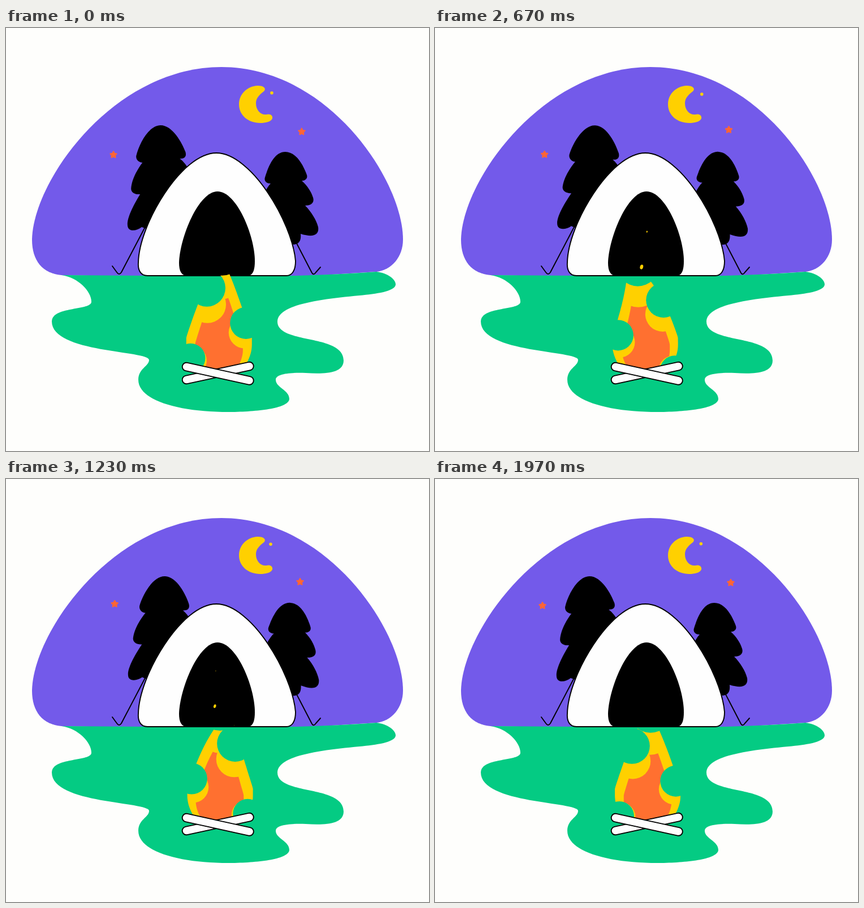
These frames come from a looping animation (748x748 px, 2 s). An HTML page:

```html
<!DOCTYPE html>
<html lang="en">
<head>
<meta charset="utf-8">
<title>Campfire at night</title>
<style>
  html, body { margin: 0; width: 100%; height: 100%; overflow: hidden; background: #fefefc; }
  svg { display: block; width: 100%; height: 100%; }
</style>
</head>
<body>
<svg viewBox="0 0 748 748">
  <defs>
    <mask id="outerMask" maskUnits="userSpaceOnUse" x="250" y="350" width="250" height="280">
      <rect x="250" y="350" width="250" height="280" fill="#fff"/>
      <g id="outerBites"/>
    </mask>
    <mask id="innerMask" maskUnits="userSpaceOnUse" x="250" y="350" width="250" height="280">
      <rect x="250" y="350" width="250" height="280" fill="#fff"/>
      <g id="innerBites"/>
    </mask>
  </defs>

  <path fill="#735aea" d="M98 437C65 434 46 412 46 374C48 270 190 69 381 69C570 69 702 270 702 374C702 405 682 428 655 431L513 440H250Z"/>
  <path fill="#04cb83" d="M98 437L250 438H513Q590 436 655 431C675 433 690 445 689 454C687 466 655 470 625 473C550 480 482 490 480 518C478 560 597 540 597 588C597 612 560 612 530 610C500 609 477 612 477 622C477 636 501 640 501 656C500 672 450 678 400 679C310 680 234 660 234 622C234 602 253 598 253 587C253 570 81 575 81 519C81 492 151 500 151 484C151 466 128 441 98 437Z"/>

  <g fill="#ffd000">
    <path d="M445 102C456 102 461 107 456 112C448 118 442 124 442 133C442 145 450 154 460 153C468 151 472 155 471 160C469 166 458 168 450 168C428 168 412 154 412 135C412 117 426 103 445 102Z"/>
    <circle id="dot" r="2.8"/>
  </g>
  <g fill="#ff6535" stroke="#ff6535" stroke-width="2" stroke-linejoin="round">
    <polygon id="starLeft"/>
    <polygon id="starRight"/>
  </g>

  <path id="treeLeft" d="M273 172C294 172 311 203 317 219C320 229 313 231 307 231C314 236 320 244 326 256L330 300L290 372L240 352C232 358 222 360 217 355C210 346 220 322 237 294C228 295 221 291 221 284C222 268 232 250 241 238C234 238 229 232 230 226C235 205 252 172 273 172Z"/>
  <path id="treeRight" d="M494 219C513 219 526 243 532 260C534 267 528 270 523 270C533 279 540 290 543 300C546 310 538 314 529 314C540 325 549 340 552 352C554 366 544 371 521 364C522 374 520 382 508 383L470 340L458 290C464 279 466 277 468 275C460 275 456 270 458 264C464 245 474 219 494 219Z"/>

  <g fill="none" stroke="#000" stroke-width="1.9" stroke-linecap="round" stroke-linejoin="round">
    <path d="M247 350L204 432Q200 438 196 432L188 421M513 379L541 433Q544 438 548 432L556 423"/>
    <path fill="#fefefe" d="M250 438C238 438 233 428 234 415C235 348 310 221 372 221C433 221 506 343 512 412C512 430 505 438 496 438Z"/>
  </g>
  <path d="M322 439C310 438 306 430 306 415C307 372 340 289 374 289C408 289 440 368 440 412C440 430 436 439 424 439Z"/>

  <g mask="url(#outerMask)">
    <path id="outerFlame" fill="#ffd000"/>
    <g mask="url(#innerMask)"><path id="innerFlame" fill="#ff7030"/></g>
  </g>
  <g id="sparks" fill="#ffd000"/>

  <g stroke-linecap="round">
    <path stroke="#000" stroke-width="16.500" d="M319 622L430.500 598"/>
    <path stroke="#fefefe" stroke-width="12.700" d="M319 622L430.500 598"/>
    <path stroke="#000" stroke-width="16.500" d="M319 599L430.500 623.500"/>
    <path stroke="#fefefe" stroke-width="12.700" d="M319 599L430.500 623.500"/>
  </g>
</svg>
<script>
  const LOOP = 2000;
  const CENTER = 376, BASE = 605, TIP = 412;
  const RISE = 0.2455, BITE_GAP = 124, BITE_TOP = 330;
  const SPARK_COUNT = 7, SPARK_GAP = 240;

  const byId = id => document.getElementById(id);
  const set = (el, attrs) => { for (const k in attrs) el.setAttribute(k, attrs[k]); };
  const addShapes = (parent, tag, count) => Array.from({ length: count }, () =>
    parent.appendChild(document.createElementNS('http://www.w3.org/2000/svg', tag)));
  const clamp = v => Math.min(1, Math.max(0, v));
  const smooth = v => clamp(v) ** 2 * (3 - 2 * clamp(v));
  const wave = (t, period, peak) => Math.cos(2 * Math.PI * (t - peak) / period);
  const move = (id, x, y) => set(byId(id), { transform: `translate(${x} ${y})` });

  const flames = [
    { path: byId('outerFlame'), bites: addShapes(byId('outerBites'), 'circle', 6), sx: 1, sy: 1, biteX: 1 },
    { path: byId('innerFlame'), bites: addShapes(byId('innerBites'), 'circle', 6), sx: 0.73, sy: 0.8, biteX: 0.95 }
  ];
  const sparks = addShapes(byId('sparks'), 'ellipse', SPARK_COUNT);

  const starPoints = Array.from({ length: 10 }, (_, i) => {
    const r = i % 2 ? 3.1 : 6, a = i * Math.PI / 5 - Math.PI / 2;
    return `${(r * Math.cos(a)).toFixed(2)},${(r * Math.sin(a)).toFixed(2)}`;
  }).join(' ');
  set(byId('starLeft'), { points: starPoints });
  set(byId('starRight'), { points: starPoints });

  // Half width of the flame: widens from the tip, then tucks in at the logs.
  const flameWidth = y => y < 560
    ? 58 * clamp((y - TIP) / 135) ** 0.75
    : 58 * Math.cos((y - 560) / 57);

  // The tip swings more than the foot.
  const lean = (y, sway) => sway * (0.25 + 0.75 * Math.min(1.4, clamp((600 - y) / 200) ** 4 * 2.8));

  function drawFlame({ path, bites, sx, sy, biteX }, t, sway) {
    const scaleY = y => BASE + (y - BASE) * sy;
    const left = [], right = [];
    for (let y = TIP; y <= 604; y += 4) {
      const point = side => {
        const x = CENTER + (side * flameWidth(y) + lean(y, sway)) * sx;
        return `${x.toFixed(1)} ${Math.min(603, scaleY(y)).toFixed(1)}`;
      };
      right.push(point(1));
      left.unshift(point(-1));
    }
    set(path, { d: `M${right.concat(left).join('L')}Z` });

    // Round bites climb both sides in turn, growing and closing in on the middle.
    bites.forEach((bite, i) => {
      const side = i % 2 ? 1 : -1;
      const travel = (side < 0 ? 584 : 522) - BITE_TOP - RISE * t;
      const y = BITE_TOP + (travel % BITE_GAP + BITE_GAP) % BITE_GAP + BITE_GAP * (i >> 1);
      const offset = 50 - 46 * smooth((540 - y) / 140);
      const x = side * offset + lean(y, sway) * 0.5;
      const r = 26 + 14 * clamp((600 - y) / 200) ** 2;
      set(bite, { cx: CENTER + x * biteX, cy: scaleY(y), r });
    });
  }

  function drawSparks(t) {
    sparks.forEach((spark, i) => {
      const rise = 0.26 * (t - 124 - SPARK_GAP * i);
      const side = i % 2 ? 1 : -1;
      const x = CENTER + side * (14 - 0.19 * rise), y = 440 - rise;
      const r = Math.max(0, (118 - rise) / 29);
      set(spark, {
        cx: x, cy: y, rx: r * 0.8, ry: r * 1.2,
        transform: `rotate(15 ${x} ${y})`,
        visibility: rise > -15 && r > 0.5 ? 'visible' : 'hidden'
      });
    });
  }

  function render(t) {
    const swing = peak => (1 + wave(t, LOOP, peak)) / 2;
    set(byId('treeLeft'), { transform: `rotate(${3.3 * swing(880)} 275 372)` });
    set(byId('treeRight'), { transform: `rotate(${3.67 * swing(1020)} 500 375)` });
    move('starLeft', 192.5 - 2.5 * wave(t, LOOP / 2, 0), 223 + 2 * wave(t, LOOP, 290));
    move('starRight', 521 + 2 * wave(t, LOOP, -100), 182 + 2 * wave(t, LOOP, 1750));
    move('dot', 470 + 2 * wave(t, LOOP / 2, 750), 115.5 + 1.6 * wave(t, LOOP, 670));
    const sway = 14 * wave(t, LOOP / 2, 180) - 3;
    flames.forEach(flame => drawFlame(flame, t, sway));
    drawSparks(t);
  }

  const began = performance.now();
  function tick() {
    render((performance.now() - began) % LOOP);
    requestAnimationFrame(tick);
  }
  tick();
</script>
</body>
</html>
```
